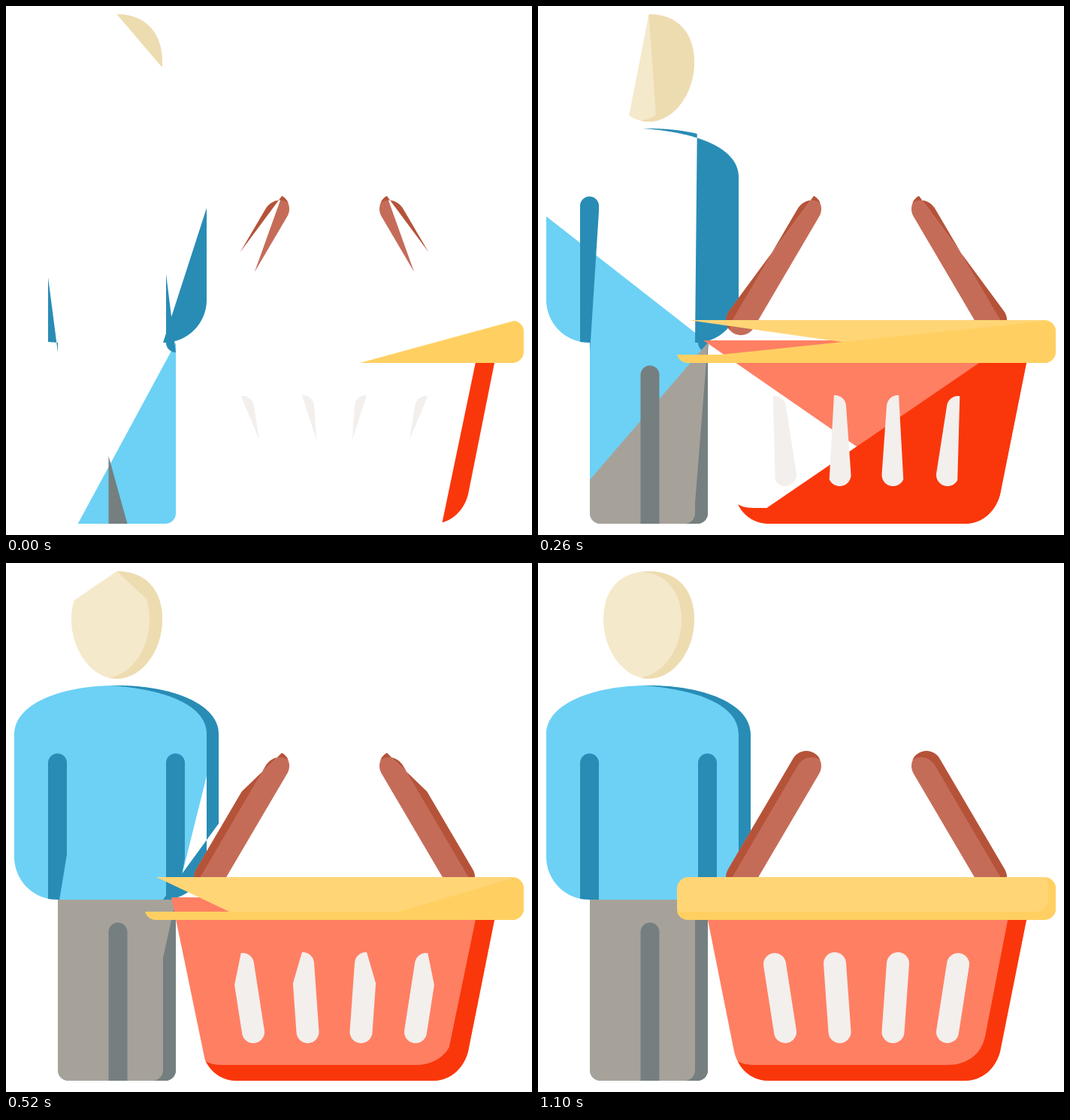
An HTML page with a canvas for the animation above (1600 ms loop, 700 px wide and 704 px high).

```html
<!DOCTYPE html>
<html lang="en">
<head>
<meta charset="utf-8">
<title>Shopper with basket</title>
<style>
html, body { margin: 0; height: 100%; overflow: hidden; background: #fff; }
canvas { display: block; }
</style>
</head>
<body>
<canvas id="stage" width="700" height="704"></canvas>
<script>
const ctx = document.getElementById('stage').getContext('2d');
const LOOP = 1600, DRAW = 1100, TICK = 20, START = 0.25;
const MIRROR = 874; // twice the basket's centre line

// Capsule outline, clockwise from the tip of its first cap
function capsule(x1, y1, x2, y2, r) {
  const len = Math.hypot(x2 - x1, y2 - y1);
  const ux = (x2 - x1) / len * r, uy = (y2 - y1) / len * r;
  const arc = (x, y) => `A${r} ${r} 0 0 1 ${x} ${y}`;
  return `M${x1 - ux} ${y1 - uy}` + arc(x1 + uy, y1 - ux) + `L${x2 + uy} ${y2 - ux}` +
    arc(x2 + ux, y2 + uy) + arc(x2 - uy, y2 + ux) + `L${x1 - uy} ${y1 + ux}` + arc(x1 - ux, y1 - uy);
}

function shape(color, d, mirrored = false) {
  const el = document.createElementNS('http://www.w3.org/2000/svg', 'path');
  el.setAttribute('d', d);
  const length = el.getTotalLength(), points = [];
  for (let s = 0; s < length; s++) points.push(el.getPointAtLength(s));
  return { color, mirrored, el, length, points, full: new Path2D(d + 'Z') };
}

const pair = (color, d) => [shape(color, d), shape(color, d, true)];

const BLUE = '#298cb5', SLATE = '#757f80', CREAM = '#f3efed';

const shapes = [
  // body
  shape('#6cd1f5', `M226 448V675A14 14 0 0 1 212 689H83A14 14 0 0 1 69 675V448
    A57 57 0 0 1 11 391V228C11 187 74 163 147 163C220 163 283 187 283 228V391A57 57 0 0 1 226 448`),
  shape(BLUE, `M209 448A57 57 0 0 0 267 391V228C267 188 210 168 139 163L147 163
    C220 163 283 187 283 228V391A57 57 0 0 1 226 448H209`),
  // arms
  shape(BLUE, 'M69 461V448L56 447V266A12.5 12.5 0 0 1 81 266V448A13 13 0 0 1 69 461'),
  shape(BLUE, 'M226 461A13 13 0 0 1 213 448V266A12.5 12.5 0 0 1 238 266V447L226 448V461'),
  // head
  shape('#f4e9cb', `M147.5 11C187 11 208 37 208 75C208 116 181 154 147.5 154
    C114 154 87 116 87 75C87 37 108 11 147.5 11`),
  shape('#eedcb1', `M147.5 11C187 11 208 37 208 75C208 116 181 154 147.5 154Q142 154 137 152.5
    C168 148 191 113 191 75C191 38 170 13 137 12L147.5 11`),
  // trousers
  shape('#a6a29a', 'M226 448V675A14 14 0 0 1 212 689H83A14 14 0 0 1 69 675V448H226'),
  shape(SLATE, 'M226 448V675A14 14 0 0 1 212 689H195A14 14 0 0 0 209 675V448H226'),
  shape(SLATE, 'M161.5 689H136.5V491A12.5 12.5 0 0 1 161.5 491V689'),
  // handles
  ...pair('#c56c59', capsule(357, 270, 270, 418, 20)),
  ...pair('#b55339', `M367 253C371 255 374 258 375.5 262C369 257 355 256 346 269L261 414
    C257 420 255 424 255 431A20 20 0 0 1 253 408L340 260A20 20 0 0 1 367 253`),
  // basket
  shape('#ff7f63', `M220 445H656L615 650C609 673 591 689 568 689H307
    C284 689 266 673 261 650L220 445`),
  shape('#fa370b', `M631 445H656L615 650C609 673 591 689 568 689H307C288 689 273 678 266 663
    C272 667 280 668 289 668H546C569 668 590 655 595 630L631 445`),
  ...pair(CREAM, capsule(315, 534, 329, 624, 15)),
  ...pair(CREAM, capsule(395, 533, 401.5, 624, 15)),
  // rim
  shape('#ffd576', `M200 418H674A15 15 0 0 1 689 433V460A15 15 0 0 1 674 475H200
    A15 15 0 0 1 185 460V433A15 15 0 0 1 200 418`),
  shape('#ffd061', `M676 419C684 420 689 426 689 433V460A15 15 0 0 1 674 475H200
    C193 475 187 471 185 464H664A15 15 0 0 0 679 449V433C679 428 678 423 676 419`)
];

// Cubic Bezier easing (.19, .22, .36, 1)
function ease(x) {
  const bezier = (s, a, b) => 3 * (1 - s) ** 2 * s * a + 3 * (1 - s) * s * s * b + s ** 3;
  let lo = 0, hi = 1;
  for (let i = 0; i < 24; i++) {
    const mid = (lo + hi) / 2;
    if (bezier(mid, 0.19, 0.36) < x) lo = mid; else hi = mid;
  }
  return bezier(lo, 0.22, 1);
}

// Fill the outline travelled so far, closed by a straight line
function fillPart(s, part) {
  ctx.setTransform(s.mirrored ? -1 : 1, 0, 0, 1, s.mirrored ? MIRROR : 0, 0);
  ctx.fillStyle = s.color;
  if (part >= 1) return ctx.fill(s.full);
  const reach = s.length * part, end = s.el.getPointAtLength(reach);
  ctx.beginPath();
  for (let i = 0; i < reach; i++) ctx.lineTo(s.points[i].x, s.points[i].y);
  ctx.lineTo(end.x, end.y);
  ctx.fill();
}

function frame(now) {
  const t = Math.floor(now % LOOP / TICK) * TICK;
  const part = t >= DRAW ? 1 : START + (1 - START) * ease(t / DRAW);
  ctx.setTransform(1, 0, 0, 1, 0, 0);
  ctx.fillStyle = '#fff';
  ctx.fillRect(0, 0, 700, 704);
  for (const s of shapes) fillPart(s, part);
  requestAnimationFrame(frame);
}
requestAnimationFrame(frame);
</script>
</body>
</html>
```
